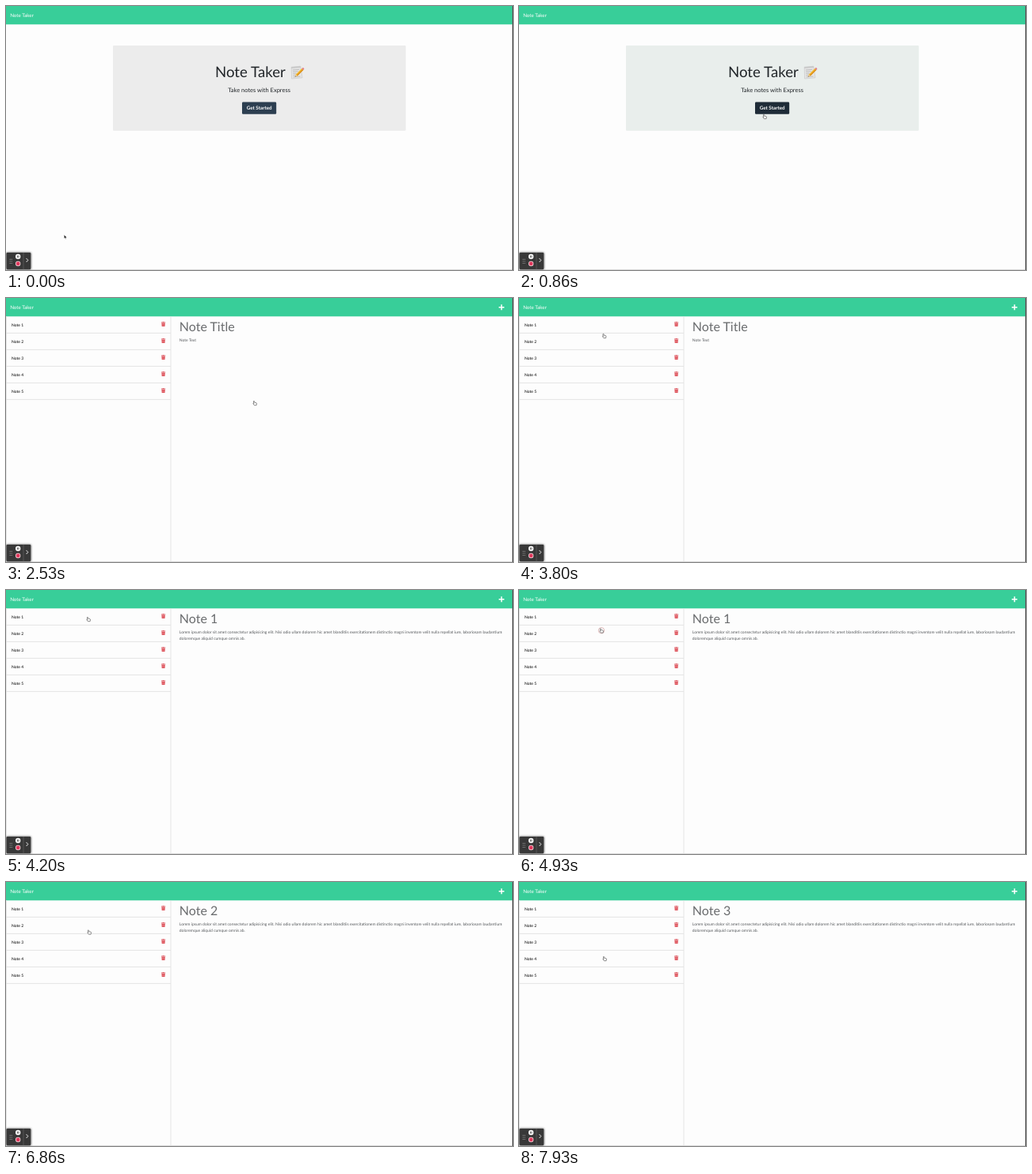
Write an HTML page that moves like this. It is 640 by 334 pixels and loops after 8000 ms.

```html
<!DOCTYPE html>
<html lang="en">
<head>
<meta charset="utf-8">
<title>Note Taker</title>
<style>
html, body { margin: 0; width: 100%; height: 100%; overflow: hidden; background: #fdfdfd; }
svg { display: block; width: 640px; height: 334px; font-family: Lato, sans-serif; text-rendering: geometricPrecision; }
</style>
</head>
<body>
<svg viewBox="0 0 640 334">
  <defs>
    <g id="trash" fill="#dc4f58">
      <path d="M196 30.6h1.6l.4-.7h1.2l.4.7h1.6v.9h-5.2z"/>
      <path d="M196.4 31.9h4.4l-.3 4.2h-3.8z"/>
      <path d="M197.6 32.7v2.7M198.6 32.7v2.7M199.6 32.7v2.7" stroke="#f0a3a7" stroke-width=".35"/>
    </g>
    <filter id="blur"><feGaussianBlur stdDeviation="1.2"/></filter>
  </defs>
  <rect width="640" height="334" fill="#fdfdfd"/>
  <rect width="640" height="23.3" fill="#38ce99"/>
  <text x="5.2" y="14" font-size="6.25" fill="#fff">Note Taker</text>

  <g id="home" text-anchor="middle" fill="#212529">
    <rect id="panel" x="135" y="50" width="369.7" height="107.8" rx="1"/>
    <text x="264" y="89.6" font-size="18.67" text-anchor="start">Note Taker</text>
    <g id="memo">
      <path d="M360.2 77.2l11.6-1 2.2 14.6-13.4 1.2z" fill="#e6e6e6" stroke="#bdbdbd" stroke-width=".5"/>
      <path d="M360.2 77.2l11.6-1 .3 1.8-11.7 1z" fill="#c9c9c9"/>
      <path d="M361.8 81l8.5-.7M362 83.2l6.8-.6M362.2 85.4l4.5-.4M362.4 87.6l3-.3M362.6 89.8l9-.8" stroke="#a2a2a2" stroke-width=".6"/>
      <path d="M364.8 89.6l1.1-3.1 7.5-7.4 2 2-7.5 7.4z" fill="#f4b92e"/>
      <path d="M366.9 87.5l7.5-7.4 1 1-7.5 7.4z" fill="#d98e1e"/>
      <path d="M373.4 79.1l.8-.8q1-.6 1.7.2t.3 1.8l-.8.8z" fill="#e0808a"/>
      <path d="M364.8 89.6l1.1-3.1 2 2z" fill="#e9cfa0"/>
      <path d="M364.8 89.6l.4-1.1.7.7z" fill="#333"/>
    </g>
    <text x="319.6" y="108.8" font-size="7.5">Take notes with Express</text>
    <rect id="button" x="298" y="121.6" width="43.2" height="15.2" rx="1.3"/>
    <text x="319.7" y="131.4" font-size="6.25" font-weight="700" fill="#fff">Get Started</text>
  </g>

  <g id="notes">
    <path d="M625.5 8.2v7M622 11.7h7" stroke="#fff" stroke-width="1.6"/>
    <path d="M.5 23.3v310M208 23.3v310" stroke="#dfdfdf" stroke-width=".8"/>
    <g id="list"></g>
    <text id="title" x="218.8" y="42" font-size="16" fill="#6a6c6e"></text>
    <g font-size="5" fill="#55585b">
      <text id="line1" x="218.8" y="55"></text>
      <text id="line2" x="218.8" y="62.5"></text>
    </g>
  </g>

  <path d="M0 333.5h640" stroke="#dcdcdc"/>
  <path d="M639.5 0v334" stroke="#555"/>

  <g id="recorder">
    <rect x="0" y="311.5" width="32" height="22" rx="2" fill="#777" filter="url(#blur)"/>
    <rect x=".6" y="312" width="30.6" height="21.2" rx="1.2" fill="#383838"/>
    <path d="M22 312v21.2" stroke="#686868" stroke-width=".6"/>
    <path d="M5.2 320v6M7.2 320v6" stroke="#aaa" stroke-dasharray=".9 1.6"/>
    <circle cx="15.2" cy="317" r="3.2" fill="#fff"/>
    <path d="M14.4 315.6v2.8M16 315.6v2.8" stroke="#333" stroke-width=".8"/>
    <circle cx="15.2" cy="326" r="3.2" fill="#f3d5da"/>
    <circle cx="15.2" cy="326" r="2.4" fill="#e0375c"/>
    <path d="M25.6 319.2l2.2 2.4-2.2 2.4" fill="none" stroke="#fff" stroke-width=".9"/>
  </g>

  <g id="cursor">
    <circle id="ring" r="3.7" cy="-.3" fill="#fff" stroke="#c98c8c" stroke-width=".6"/>
    <path id="arrow" d="M-.6-2.5v4.6l1.1-.9.7 1.6.8-.4-.7-1.5h1.4z" fill="#111" stroke="#fff" stroke-width=".35"/>
    <path id="hand" d="M-1.3-2.6q.6-.3.8.3l.4 1.5 1.9.4q.8.2.7 1l-.4 2.1H-.6L-2 .8q-.3-.6.3-.7l.7.4-.7-2.5q0-.4.4-.6z" fill="#fff" stroke="#333" stroke-width=".55"/>
  </g>
</svg>
<script>
const LOOP = 8000, OPEN = 2530, HOVER = 860, FOCUS = 1730;
const CLICKS = [3930, 4930, 7260], CLICK_MS = 200;
const LOREM = [
  "Lorem ipsum dolor sit amet consectetur adipisicing elit. Nisi odio ullam dolorem hic amet blanditiis exercitationem distinctio magni inventore velit nulla repellat iure, laboriosam laudantium",
  "doloremque aliquid cumque omnis ab."
];
// Pointer path: time, x, y
const PATH = [
  [60, 74, 292], [860, 310, 140], [930, 310, 140], [1060, 314, 133],
  [3130, 314, 133], [3330, 235, 105], [3600, 107.5, 48], [3800, 107.5, 48],
  [4000, 104, 37], [4460, 104, 37], [4730, 104, 51.5], [5300, 104, 51.5],
  [5730, 106, 57], [5800, 106, 57], [6530, 105, 63.5], [6860, 105, 63.5],
  [7000, 107, 79], [7860, 107, 79], [7930, 108, 97]
];
const $ = id => document.getElementById(id);
const show = (id, on) => $(id).setAttribute("visibility", on ? "visible" : "hidden");
const paint = (id, attrs) => { for (const k in attrs) $(id).setAttribute(k, attrs[k]); };

$("list").innerHTML = [0, 1, 2, 3, 4].map(i => `<g transform="translate(0 ${i * 21})">
  <text x="7" y="35.7" font-size="5" font-weight="500" fill="#111">Note ${i + 1}</text>
  <use href="#trash"/><path d="M0 44.4h208" stroke="#dfdfdf" stroke-width=".8"/></g>`).join("");

function pointer(t) {
  const i = PATH.findIndex(p => p[0] > t);
  if (i === 0) return PATH[0].slice(1);
  if (i < 0) return PATH[PATH.length - 1].slice(1);
  const [a, b] = [PATH[i - 1], PATH[i]];
  const u = (t - a[0]) / (b[0] - a[0]), s = u * u * (3 - 2 * u);
  return [a[1] + (b[1] - a[1]) * s, a[2] + (b[2] - a[2]) * s];
}

function draw(t) {
  const home = t < OPEN, [x, y] = pointer(t);
  show("home", home);
  show("notes", !home);
  paint("panel", { fill: t < HOVER ? "#ececec" : "#e9eeec" });
  paint("button", {
    fill: t < HOVER ? "#2c3e50" : "#1e2b37",
    stroke: t < FOCUS ? "none" : "#8195a5"
  });

  const note = CLICKS.filter(c => t >= c + CLICK_MS).length;
  $("title").textContent = note ? "Note " + note : "Note Title";
  $("line1").textContent = note ? LOREM[0] : "Note Text";
  $("line2").textContent = note ? LOREM[1] : "";

  const arrow = t < HOVER - 60 || (t > 3130 && x > 208);
  paint("cursor", { transform: `translate(${x} ${y})` });
  show("arrow", arrow);
  show("hand", !arrow);
  show("ring", CLICKS.some(c => t >= c && t < c + CLICK_MS));
}

const start = performance.now();
function tick() {
  draw((performance.now() - start) % LOOP);
  requestAnimationFrame(tick);
}
tick();
</script>
</body>
</html>
```
